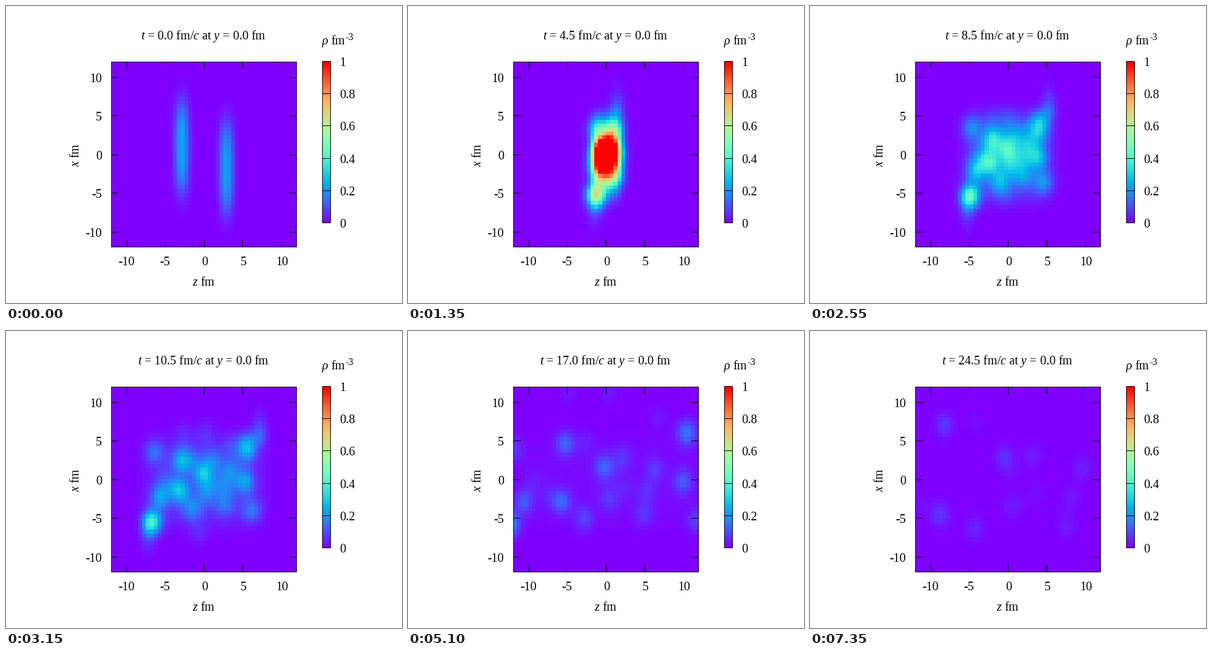
These frames come from a looping animation (640x480 px, 7500 ms). A matplotlib script:

```python
import numpy as np
import matplotlib.pyplot as plt
from matplotlib.animation import FuncAnimation

plt.rcParams.update({
    "font.family": "Liberation Serif",
    "mathtext.fontset": "custom",
    "mathtext.rm": "Liberation Serif",
    "mathtext.it": "Liberation Serif:italic",
})

W, H, DPI = 640, 480, 100
FRAMES, INTERVAL, DT = 50, 150, 0.5
LEFT, TOP, SIZE, LIM = 170, 90, 300, 12
T_HIT, T_REF = 3.0, 10.5  # time of full overlap, time at which heights apply
BEAM = .96                # nucleus speed along z

# Main clumps leaving the collision: z speed, x start, x speed, height.
CLUMPS = [
    (-.88, -5.1, -.05, .30), (-.76, -1.5, -.10, .18), (-.41, .2, -.22, .20),
    (-.38, 0, .33, .20), (-.02, -.2, .14, .17), (.75, 3.0, .20, .18),
    (.71, -.3, 0, .18), (.83, -2.5, -.20, .13), (-.86, 3.2, .05, .12),
    (-.20, -2.5, -.18, .13), (.35, -1.6, -.20, .10), (.45, 1.0, .02, .11),
    (.15, 2.0, .05, .10), (.03, 0, .80, .05), (-.35, 0, .80, .04),
    (-.08, 0, -.93, .04), (.38, 0, -.11, .08), (.03, -1.0, -.11, .10),
]
rng = np.random.default_rng(4)
faint = np.column_stack([rng.uniform(-.8, .8, 8), np.zeros(8),
                         rng.uniform(-.6, .6, 8), np.full(8, .05)])
clumps = np.vstack([CLUMPS, faint])

cells = np.arange(-LIM + .25, LIM, .5)
Z, X = np.meshgrid(cells, cells)


def ease(t, start, end):
    u = np.clip((t - start) / (end - start), 0, 1)
    return u * u * (3 - 2 * u)


def nucleus(t, side, center, height):
    """A flat disc; only its outer part, off the overlap, flies on."""
    z = side * BEAM * (t - T_HIT)
    shape = np.exp(-((Z - z) / .95) ** 2 - (np.abs(X - center) / 6) ** 3)
    outer = 1 / (1 + np.exp(-2 * (side * X - 5)))
    gone = ease(t, 1.5, 4.5)
    return height * shape * (1 - gone * (1 - outer))


def glow(age):
    """Smooth background that stretches along the beam and thins out."""
    wz, wx = np.hypot(1.2, .95 * age), 5 + .1 * age
    fade = .07 * np.exp((T_REF - T_HIT - age) / 4)
    return fade * np.exp(-(Z / wz) ** 4 - ((X + .3) / wx) ** 4)


def fragments(age):
    vz, x0, vx, a = clumps.T
    a = a * np.exp((T_REF - T_HIT - age) / 13)
    gz = np.exp(-.5 * ((cells[:, None] - vz * age) / .85) ** 2)
    gx = np.exp(-.5 * ((cells[:, None] - x0 - vx * age) / 1.1) ** 2)
    return (gx * a) @ gz.T


def density(t):
    age = max(t - T_HIT, 0)
    return (nucleus(t, 1, 1.0, .23) + nucleus(t, -1, -1.7, .22)
            + ease(t, 1, 4) * (glow(age) + fragments(age)))


def title_text(t):
    return rf"$t$ = {t:.1f} fm/$c$ at $y$ = 0.0 fm"


fig = plt.figure(figsize=(W / DPI, H / DPI), dpi=DPI, facecolor="white")
ax = fig.add_axes([0, 0, 1, 1])
ax.axis("off")


def put(x, y, s, px=20, **kw):
    kw.setdefault("ha", "left")
    return ax.text(x, y, s, fontsize=px * 72 / DPI, va="baseline",
                   rotation_mode="anchor", **kw)


def line(xs, ys):
    ax.plot(xs, ys, color="black", lw=72 / DPI, snap=False,
            solid_capstyle="projecting", solid_joinstyle="miter")


def box(x0, y0, x1, y1):
    line([x0, x1, x1, x0, x0], [y0, y0, y1, y1, y0])


style = dict(cmap="rainbow", vmin=0, vmax=1, origin="lower",
             aspect="auto", interpolation="nearest")
heat = ax.imshow(density(0), extent=(LEFT, LEFT + SIZE, TOP + SIZE, TOP), **style)
ax.imshow(np.linspace(0, 1, 261)[:, None], extent=(511, 525, 351, 90), **style)
ax.set_xlim(0, W)
ax.set_ylim(H, 0)

x0, y0, x1, y1 = LEFT + .5, TOP + .5, LEFT + SIZE - .5, TOP + SIZE - .5
box(x0, y0, x1, y1)
for v in range(-10, 11, 5):
    px = int(LEFT + SIZE / 2 + v * 12.5) + .5
    py = int(TOP + SIZE / 2 - v * 12.5) + .5
    for a, b in ((y0, y0 + 11), (y1 - 11, y1)):
        line([px, px], [a, b])
    for a, b in ((x0, x0 + 11), (x1 - 11, x1)):
        line([a, b], [py, py])
    put(px + (1 if v >= 0 else -.5), 419, str(v), ha="center")
    put(155, py + 7.5, str(v), ha="right")

box(511.5, 89.5, 524.5, 350.5)
for i in range(6):
    py = 350.5 - round(i * 52.2)
    line([511.5, 524.5], [py, py])
    put(539.5, py + 7.5, f"{i / 5:g}")

title = put(319, 54, title_text(0), ha="center")
put(319, 452, "$z$ fm", ha="center")
put(118, 240.5, "$x$ fm", ha="center", rotation=90)
put(511, 62, "ρ", style="italic")
put(525.5, 62, "fm")
put(548.5, 55, "-3", px=16)


def draw(i):
    t = i * DT
    heat.set_data(density(t))
    title.set_text(title_text(t))
    return heat, title


anim = FuncAnimation(fig, draw, frames=FRAMES, interval=INTERVAL,
                     repeat=True, blit=False)
plt.show()
```
